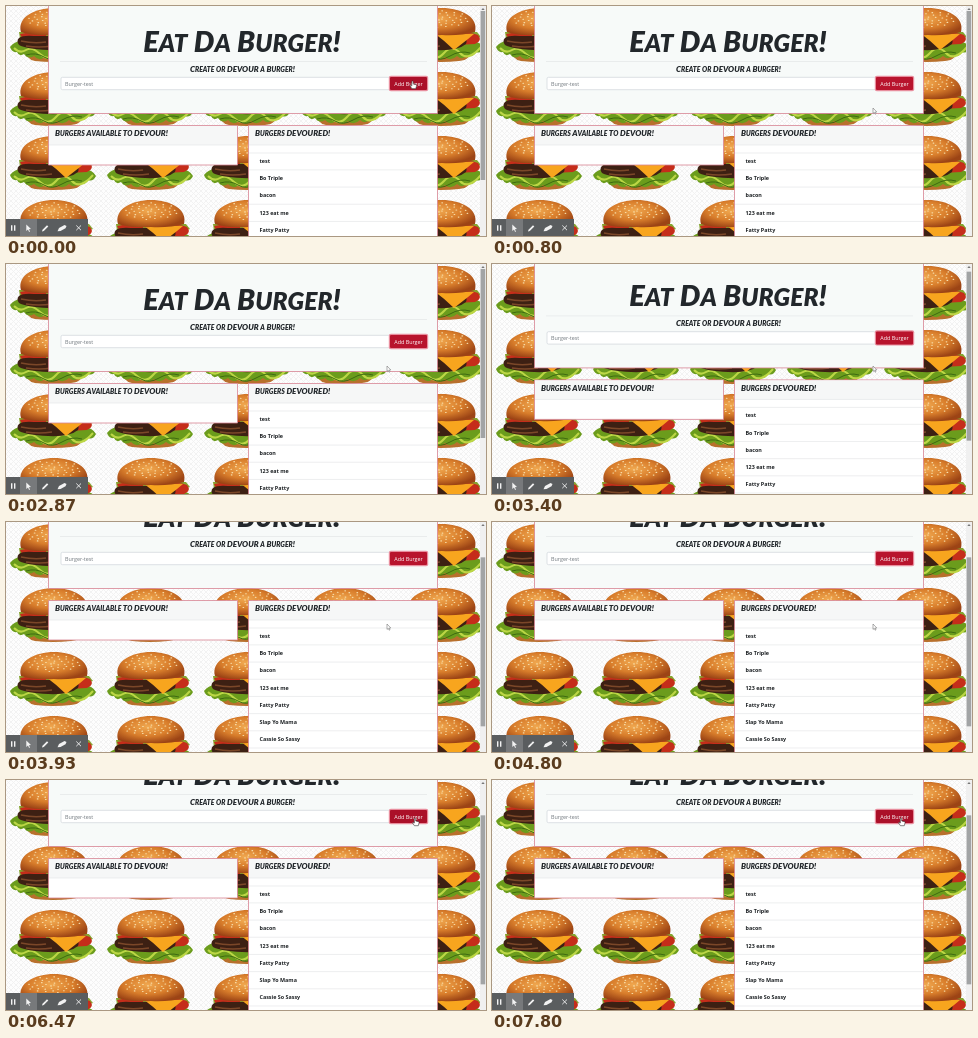
An HTML page that plays this animation: 480 px wide and 230 px high, repeating every 8000 ms.

```html
<!DOCTYPE html>
<html lang="en">
<head>
<meta charset="utf-8">
<title>Burger list</title>
<style>
html, body { margin: 0; width: 100%; height: 100%; overflow: hidden; }
svg { display: block; width: 480px; height: 230px; }
text { font: 700 5.4px "Open Sans", "Noto Sans", sans-serif; fill: #1d2124; }
.display { font: italic 900 8px Lato, sans-serif; fill: #22272b; }
.title { font-size: 29px; letter-spacing: .1px; }
.small { font-size: .85em; }
.middle { text-anchor: middle; }
.panel { fill: #fff; stroke: #d78593; stroke-width: .8; }
.head { fill: #f6f7f7; }
.line { stroke: #e1e3e4; stroke-width: .6; }
</style>
</head>
<body>
<svg viewBox="0 0 480 230">
  <defs>
    <radialGradient id="bun" cx=".45" cy=".4" r=".62">
      <stop offset="0" stop-color="#f0a850"/>
      <stop offset=".55" stop-color="#d87d2b"/>
      <stop offset="1" stop-color="#9c4415"/>
    </radialGradient>
    <pattern id="weave" width="5" height="5" patternUnits="userSpaceOnUse">
      <path d="M0 0L5 5M5 0L0 5" stroke="#f0f0f1" stroke-width=".9"/>
    </pattern>
    <pattern id="burgers" width="97" height="64" patternUnits="userSpaceOnUse">
      <path d="M20 43H76Q78 54 65 55Q47 57 29 55Q19 53 20 43" fill="#b8702c"/>
      <path d="M4 41Q10 33 20 36L78 35Q87 36 90 42Q87 48 82 46Q79 52 73 49Q69 55 63 50Q57 56 51 51Q45 56 39 51Q33 56 28 50Q22 54 18 48Q13 51 11 46Q6 47 4 41" fill="#6b9c1c"/>
      <path d="M8 42Q14 48 20 44T34 48T50 47T66 47T87 41" fill="none" stroke="#bcd745" stroke-width="2"/>
      <path d="M20 49Q30 46 38 51T56 50T76 47" fill="none" stroke="#3d6a10" stroke-width="1"/>
      <path d="M13 26H83L87 31Q70 37 14 33Z" fill="#86a52f"/>
      <path d="M14 28Q25 25 40 28V32H16ZM58 29Q76 25 84 29Q89 35 81 38L62 39Z" fill="#c52d1a"/>
      <path d="M13 32Q17 29 28 30H63Q75 31 72 38Q64 45 42 44Q20 43 13 39Q10 35 13 32" fill="#3d2013"/>
      <path d="M15 35Q28 38 40 36M20 40Q33 42 46 40" fill="none" stroke="#7b4728" stroke-width="1.4"/>
      <path d="M40 27L80 28L74 33L60 44Q51 35 40 27" fill="#f8a51e"/>
      <path d="M15 26C11 11 29 2 48 2C67 2 85 11 81 26Q66 30 48 29Q26 30 15 26" fill="url(#bun)"/>
      <g id="seeds" fill="#fae3b0"></g>
    </pattern>
  </defs>

  <path fill="#fdfdfd" d="M0 0H480V230H0Z"/>
  <path fill="url(#weave)" d="M0 0H480V230H0Z"/>
  <path fill="url(#burgers)" d="M0 0H480V230H0Z"/>

  <g id="page">
    <path class="panel" style="fill:#f7faf9" d="M42.5 -9H431.5V107.5H42.5Z"/>
    <text class="display title middle" x="236" y="46">Eat Da Burger!</text>
    <path class="line" d="M54 55.5H421"/>
    <text class="display middle" x="236.5" y="66">Create or DEVOUR a Burger!</text>
    <rect x="55" y="71.3" width="329" height="12.4" rx="1.5" fill="#fff" stroke="#ced4da" stroke-width=".7"/>
    <text x="59" y="79.6" style="font-weight:400;fill:#70777d">Burger-test</text>
    <rect x="382.8" y="69.8" width="39.4" height="15.4" rx="2" fill="#e88d9d"/>
    <rect id="button" x="384" y="71" width="37" height="13" rx="1"/>
    <text class="middle" x="402.5" y="79.6" style="font-weight:500;fill:#fff">Add Burger</text>

    <path class="panel" d="M42.5 119.5H231.5V159H42.5Z"/>
    <path class="head" d="M43 120H231V139H43Z"/>
    <text class="display" x="49" y="130.3">Burgers Available To DEVOUR!</text>
    <path class="panel" d="M242.5 119.5H431.5V288H242.5Z"/>
    <path class="head" d="M243 120H431V139H243Z"/>
    <text class="display" x="249" y="130.3">Burgers DEVOURED!</text>
    <path class="line" d="M43 139H231M243 139H431"/>
    <g id="list"></g>
  </g>

  <path fill="#f0f0f0" d="M474 0H480V230H474Z"/>
  <path fill="#777" d="M475.3 4L477 2L478.7 4Z"/>
  <rect id="thumb" x="474.6" y="5" width="4.6" height="169" fill="#a2a4a5"/>

  <path fill="#5a5d5f" d="M0 213H82V230H0Z"/>
  <path fill="#77797b" d="M14 213H31V230H14Z"/>
  <g fill="#f2f2f2">
    <path d="M5 219.3H6.4V224.7H5ZM8 219.3H9.4V224.7H8Z"/>
    <path d="M20.3 218.5L25 223L22.9 223.2L24 225.6L23.1 226L22 223.6L20.3 225Z"/>
    <path d="M36 225.5L36.5 223.8L41 219.3L42.3 220.6L37.8 225Z"/>
    <path d="M51.5 225.3L53 222L58.5 219L60.5 220L59.5 222.3L54.5 225Z"/>
    <path d="M70.3 219.5L75 224.2M75 219.5L70.3 224.2" stroke="#f2f2f2" stroke-width=".9"/>
  </g>

  <g id="cursor" stroke-width=".6" stroke-linejoin="round" fill="#fff">
    <path id="arrow" stroke="#777" d="M0 0V5.4L1.3 4.3L2.1 6.2L3 5.8L2.2 4H3.8Z"/>
    <path id="hand" stroke="#333" d="M-.7 .4Q0 -.5 .7 .4V3L3.6 3.7Q4.3 4 4 5L3.3 7.7H-.6L-2.5 4.8Q-2.2 3.8 -.7 5Z"/>
  </g>
</svg>
<script>
const LOOP = 8000, FPS = 15;
const $ = id => document.getElementById(id);
const clamp = v => Math.min(1, Math.max(0, v));
const progress = (t, from, to) => clamp((t - from) / (to - from));
const smooth = p => p * p * (3 - 2 * p);

// Display type: lowercase becomes slightly smaller capitals.
for (const el of document.querySelectorAll('.display'))
  el.innerHTML = el.textContent.replace(/[a-z]+/g,
    s => `<tspan class="small">${s.toUpperCase()}</tspan>`);

const burgers = ['test', 'Bo Triple', 'bacon', '123 eat me', 'Fatty Patty',
  'Slap Yo Mama', 'Cassie So Sassy'];
$('list').innerHTML = '<path class="line" d="M243 147H431"/>' + burgers.map((name, i) => {
  const y = 157.1 + i * 17.18;
  return `<text x="253.5" y="${y}">${name}</text>
    <path class="line" d="M243 ${y + 6.8}H431"/>`;
}).join('');

for (let i = 0; i < 44; i++) {
  const angle = i * 2.4, r = Math.sqrt(i / 44);
  $('seeds').innerHTML += `<ellipse cx="${48 + 27 * r * Math.cos(angle)}"
    cy="${13 + 9 * r * Math.sin(angle)}" rx=".9" ry=".55"/>`;
}

// Pointer stops: start time, end time, x, y.
const moves = [[70, 470, 381, 102], [5530, 6200, 450, 46], [6460, 6461, 409, 38]];

function draw(now) {
  const t = Math.floor((now % LOOP + 1) * FPS / 1000) * 1000 / FPS;
  const scroll = 41 * Math.sin(progress(t, 3372, 3872) * Math.PI / 2);
  let x = 406.5, y = 75;
  for (const [from, to, toX, toY] of moves) {
    const p = smooth(progress(t, from, to));
    x += (toX - x) * p;
    y += (toY - y) * p;
  }
  const over = x > 384 && x < 421 && y + scroll > 71 && y + scroll < 84;
  $('page').setAttribute('transform', `translate(0 ${-scroll})`);
  $('thumb').setAttribute('y', 5 + scroll * .74);
  $('cursor').setAttribute('transform', `translate(${x} ${y})`);
  $('hand').style.display = over ? '' : 'none';
  $('arrow').style.display = over ? 'none' : '';
  $('button').setAttribute('fill', over ? '#ab1029' : '#b8142d');
  requestAnimationFrame(draw);
}
requestAnimationFrame(draw);
</script>
</body>
</html>
```
